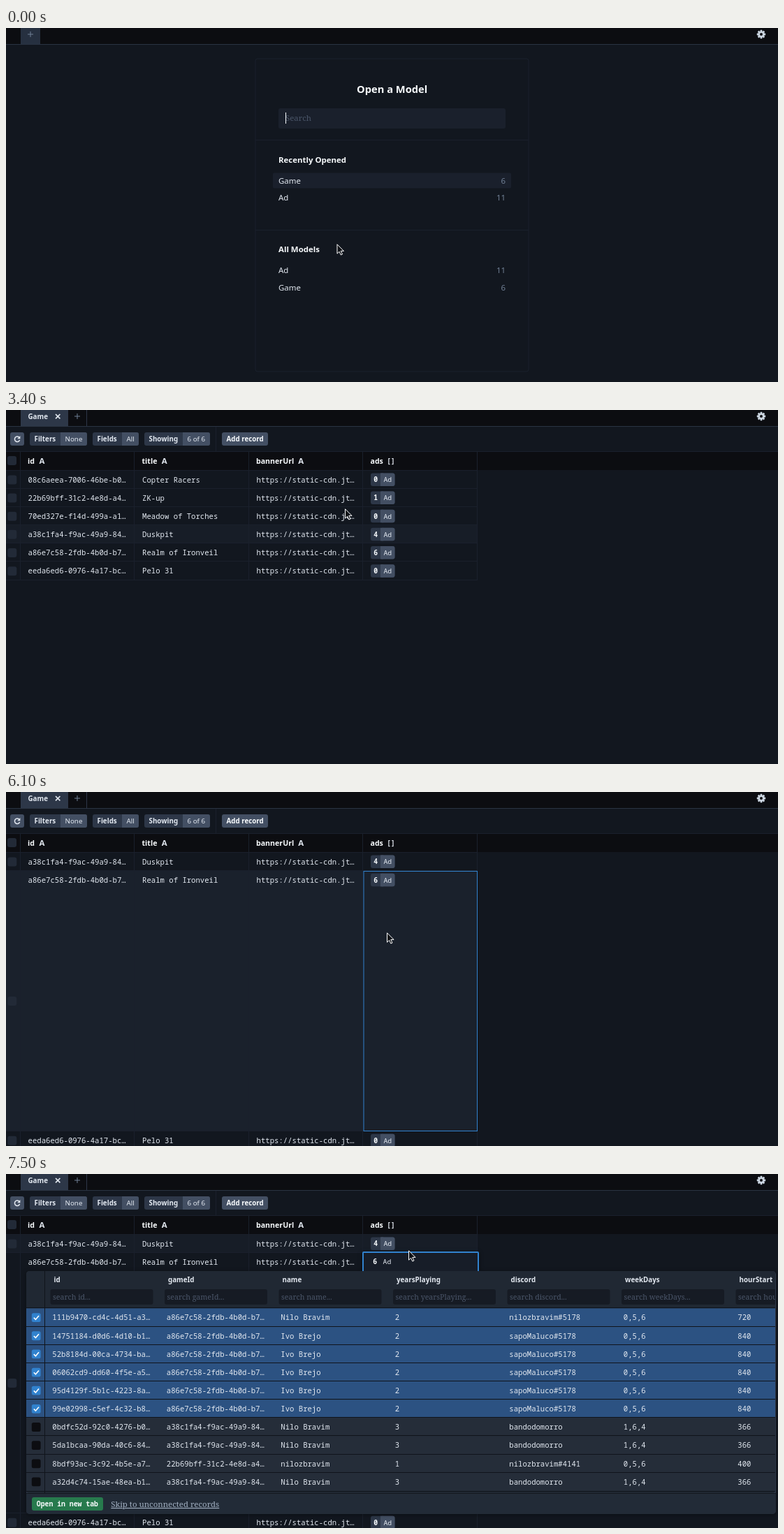
An HTML page that plays this animation: 1105 by 507 pixels, repeating every 8 s.

```html
<!DOCTYPE html>
<html lang="en">
<head>
<meta charset="utf-8">
<title>Data browser</title>
<style>
html, body { margin: 0; width: 100%; height: 100%; overflow: hidden; background: #12171f; }
svg { display: block; width: 1105px; height: 507px; }
text { fill: #e2e8f0; white-space: pre; }
.sans { font-family: "Noto Sans", sans-serif; }
.mono { font-family: "Noto Sans Mono", monospace; }
.serif { font-family: "Noto Serif", serif; }
.b { font-weight: 700; }
.s12 { font-size: 9.81px; }
.s13 { font-size: 10.62px; }
.s14 { font-size: 11.44px; }
.s18 { font-size: 14.7px; }
.dim { fill: #718096; }
.faint { fill: #4a5568; }
.end { text-anchor: end; }
.white { fill: #f7fafc; }
.link { fill: #a0aec0; text-decoration: underline; }
</style>
</head>
<body>
<svg id="stage" viewBox="0 0 1105 507"></svg>
<script>
const LOOP = 8000, COL = 163.5, ROW = 26.15;
const stage = document.getElementById('stage');

const el = (parent, tag, attrs = {}, body) => {
  const node = document.createElementNS('http://www.w3.org/2000/svg', tag);
  for (const key in attrs) node.setAttribute(key, attrs[key]);
  if (body !== undefined) node.textContent = body;
  parent.appendChild(node);
  return node;
};
const group = parent => el(parent, 'g');
const box = (p, x, y, x2, y2, fill, rx = 0, extra = {}) =>
  el(p, 'rect', { x, y, width: x2 - x, height: y2 - y, fill, rx, ...extra });
const text = (p, x, y, str, cls) => el(p, 'text', { x, y, class: cls }, str);
const line = (p, d, stroke, width = 1) =>
  el(p, 'path', { d, stroke, 'stroke-width': width, fill: 'none' });
const show = (node, on) => { node.style.display = on ? '' : 'none'; };

const C = {
  page: '#12171f', black: '#0c0d11', edge: '#1a202c', slate: '#2d3748',
  steel: '#434f63', check: '#222a37', blue: '#3182ce', pale: '#cbd5e0'
};

// ---- tab bar ----
box(stage, 0, 0, 1105, 507, C.page);
box(stage, 0, 0, 1105, 23, C.black);
line(stage, 'M0 23.5H1105', '#2a3342');
const gear = group(stage);
gear.setAttribute('transform', 'translate(1081 9)');
for (let i = 0; i < 8; i++)
  box(gear, -1.4, -6.2, 1.4, -3, C.pale, 0.6, { transform: `rotate(${i * 45})` });
el(gear, 'circle', { r: 3.3, fill: 'none', stroke: C.pale, 'stroke-width': 2.6 });
const plus = (p, x, color) => line(p, `M${x - 4} 9H${x + 4}M${x} 5V13`, color);

// ---- model picker ----
const picker = group(stage);
box(picker, 21, 0, 49, 23, '#263040');
plus(picker, 35, '#718096');
box(picker, 357, 44, 748, 492, 'none', 3, { stroke: C.edge });
line(picker, 'M357 160.5H748M357 289.5H748', C.edge);
text(picker, 502, 93, 'Open a Model', 'sans b s18 white');
box(picker, 390, 115, 715, 144, C.edge, 3);
text(picker, 400, 133, 'Search', 'serif s14 faint');
const caret = box(picker, 400, 121, 401, 137, '#f7fafc');
text(picker, 390, 193, 'Recently Opened', 'sans b s14 white');
text(picker, 390, 321, 'All Models', 'sans b s14 white');
box(picker, 382, 207.5, 723, 229.5, C.edge, 2);

const modelRow = (y, name, count) => {
  const back = box(picker, 382, y - 15, 723, y + 7.5, C.edge, 2);
  const label = text(picker, 390, y, name, 'sans s14');
  const num = text(picker, 715, y, count, 'sans s14 dim end');
  return on => {
    show(back, on);
    label.style.fill = on ? '#fff' : '';
    num.style.fill = on ? '#a0aec0' : '';
  };
};
modelRow(222.5, 'Game', 6)(false);
modelRow(247, 'Ad', 11)(false);
const models = [modelRow(350.5, 'Ad', 11), modelRow(375.5, 'Game', 6)];

// ---- open model: tab and toolbar ----
const model = group(stage);
box(model, 21, 0, 89, 23, C.slate);
text(model, 31.5, 12.5, 'Game', 'sans b s12');
line(model, 'M71 6L77.4 12.4M77.4 6L71 12.4', '#e2e8f0', 1.7);
plus(model, 102, '#718096');
line(model, 'M115.5 0V23', C.slate);
line(model, 'M0 59.5H1105M300.5 24V59', C.edge);
box(model, 6, 32, 26, 51, C.steel, 3);
line(model, 'M18.8 39.2A3.7 3.7 0 1 0 19.6 43', '#e2e8f0', 1.5);
el(model, 'path', { d: 'M20.4 37V41.2H16.2Z', fill: '#e2e8f0' });

const pill = (x, mid, end, label, value) => {
  box(model, x, 32, end, 51, C.slate, 3);
  box(model, mid, 32, end, 51, C.steel, 3);
  box(model, mid, 32, mid + 4, 51, C.steel);
  text(model, x + 6.5, 45, label, 'sans b s12');
  return text(model, mid + 6.5, 45, value, 'sans s12');
};
pill(34, 78, 116, 'Filters', 'None');
pill(124, 166, 190, 'Fields', 'All');
const showing = pill(198, 253, 292, 'Showing', '0 of 6');
box(model, 309, 32, 375, 51, C.steel, 3);
text(model, 315.5, 45, 'Add record', 'sans b s12 white');

// ---- records table ----
const table = group(model);
box(table, 0, 60, 1105, 86, C.black);
line(table, 'M0 86.5H675', C.edge);
box(table, 2, 66, 15, 79, C.check, 3);
['id', 'title', 'bannerUrl', 'ads'].forEach((name, i) =>
  text(table, 31 + i * COL, 77, name, 'sans b s13 white'));
[47.5, 222.7, 418.3].forEach(x => text(table, x, 77, 'A', 'sans b s14'));
text(table, 545, 76.5, '[]', 'mono b s12');

const games = [
  ['08c6aeea-7006-46be-b0…', 'Copter Racers', 0],
  ['22b69bff-31c2-4e8d-a4…', 'ZK-up', 1],
  ['70ed327e-f14d-499a-a1…', 'Meadow of Torches', 0],
  ['a38c1fa4-f9ac-49a9-84…', 'Duskpit', 4],
  ['a86e7c58-2fdb-4b0d-b7…', 'Realm of Ironveil', 6],
  ['eeda6ed6-0976-4a17-bc…', 'Pelo 31', 0]
];

const gameRow = (p, [id, title, ads], top, height = ROW) => {
  const g = group(p), mid = top + 13.3;
  const back = box(g, 0, top, 675, top + height, '#171d27');
  const cy = height > ROW ? top + height / 2 : mid;
  box(g, 2.3, cy - 6.5, 15.3, cy + 6.5, C.check, 3);
  [id, title, 'https://static-cdn.jt…'].forEach((s, i) =>
    text(g, 31.6 + i * COL, mid + 3.8, s, 'mono s13'));
  box(g, 522, mid - 9.5, 556.5, mid + 9, C.slate, 3);
  box(g, 536, mid - 9.5, 556.5, mid + 9, C.steel, 3);
  box(g, 536, mid - 9.5, 540, mid + 9, C.steel);
  text(g, 526.3, mid + 3.4, ads, 'mono b s12 white');
  text(g, 540.4, mid + 3.4, 'Ad', 'mono s12');
  line(g, `M0 ${Math.round(top + height) - 0.5}H675`, C.edge);
  return back;
};
const colLines = (p, y2) =>
  line(p, [0, 1, 2, 3, 4].map(i => `M${Math.floor(21 + i * COL) - 0.5} 60V${y2}`).join(''), C.edge);

const list = group(table);
const backs = games.map((game, i) => gameRow(list, game, 86.6 + i * ROW));
colLines(list, 243);

// ---- list scrolled, one row opened ----
const open = group(table);
const firstBack = gameRow(open, games[3], 86.6);
const openBack = gameRow(open, games[4], 113, 373);
openBack.setAttribute('fill', '#1a212c');
show(gameRow(open, games[5], 486), false);
colLines(open, 507);
const cell = box(open, 512, 113.5, 674.5, 485.5, 'none', 0, { stroke: C.blue });

// ---- relation panel ----
const panel = group(open);
panel.style.filter = 'drop-shadow(0 1px 3px rgba(0,0,0,.4))';
box(panel, 511, 112, 676, 145, '#171d28', 1, { stroke: C.blue, 'stroke-width': 2 });
text(panel, 525.3, 128.5, 6, 'mono b s12 white');
text(panel, 539.5, 128.5, 'Ad', 'mono s12');
box(panel, 29, 139, 1102, 487, C.slate, 5);
box(panel, 29, 458, 1102, 487, '#222b37', 5);
box(panel, 29, 458, 1102, 470, '#222b37');
line(panel, 'M29 457.5H1102', '#141920');
box(panel, 37, 463, 139, 482, '#277a4d', 3);
text(panel, 43.8, 476, 'Open in new tab', 'mono b s12 white');
text(panel, 150.3, 477, 'Skip to unconnected records', 'serif s14 link');

const loading = group(panel);
box(loading, 530.5, 286.5, 600.5, 310.5, C.slate, 3,
  { stroke: '#4a5568', style: 'filter:drop-shadow(0 1px 2px rgba(0,0,0,.35))' });
text(loading, 536, 302, 'Loading...', 'mono s12');

const G = ['a86e7c58-2fdb-4b0d-b7…', 'a38c1fa4-f9ac-49a9-84…', '22b69bff-31c2-4e8d-a4…'];
const mate = id => [id, G[0], 'Ivo Brejo', 2, 'sapoMaluco#5178', '0,5,6', 840];
const band = id => [id, G[1], 'Nilo Bravim', 3, 'bandodomorro', '1,6,4', 366];
const ads = [
  ['111b9470-cd4c-4d51-a3…', G[0], 'Nilo Bravim', 2, 'nilozbravim#5178', '0,5,6', 720],
  mate('14751184-d0d6-4d10-b1…'),
  mate('52b8184d-00ca-4734-ba…'),
  mate('06062cd9-dd60-4f5e-a5…'),
  mate('95d4129f-5b1c-4223-8a…'),
  mate('99e02998-c5ef-4c32-b8…'),
  band('0bdfc52d-92c0-4276-b0…'),
  band('5da1bcaa-90da-40c6-84…'),
  ['8bdf93ac-3c92-4b5e-a7…', G[2], 'nilozbravim', 1, 'nilozbravim#4141', '0,5,6', 400],
  band('a32d4c74-15ae-48ea-b1…')
];

const clip = el(stage, 'clipPath', { id: 'inner' });
box(clip, 29, 139, 1101, 457, '#fff', 4);
const grid = group(panel);
grid.setAttribute('clip-path', 'url(#inner)');
box(grid, 29, 139, 1102, 462, '#202833', 4);
['id', 'gameId', 'name', 'yearsPlaying', 'discord', 'weekDays', 'hourStart'].forEach((name, i) => {
  const x = i * COL;
  text(grid, 68.5 + x, 154.5, name, 'sans b s12');
  box(grid, 63.5 + x, 165, 210.5 + x, 187, '#161b24', 3);
  text(grid, 67 + x, 179.5, `search ${name}...`, 'serif s13 faint');
});
ads.forEach((row, i) => {
  const top = 192.4 + i * ROW, mid = top + 13.2, on = i < 6;
  box(grid, 29, top, 1102, top + ROW, on ? '#2c5282' : '#252d39');
  line(grid, `M29 ${Math.round(top) - 0.5}H1102`, '#10141b');
  box(grid, 36.8, mid - 6.4, 49.6, mid + 6.4, on ? C.blue : C.black, 2.5);
  if (on) line(grid, `M39.8 ${mid + 0.2}l2.6 2.6l4.6 -5.4`, '#fff', 1.6);
  row.forEach((s, c) => text(grid, 66.3 + c * COL, mid + 3.8, s, 'mono s13'));
});
line(grid, 'M29 454.5H1102M55.5 139V457', '#10141b');

// ---- pointer ----
const pointer = el(stage, 'path', {
  d: 'M.5 .8V14.2L3.6 11.3L5.8 16L8 15L5.8 10.4H10Z',
  fill: '#0e1116', stroke: '#fff', 'stroke-width': 1, 'stroke-linejoin': 'round'
});

// time, x, y
const moves = [
  [0, 473.5, 309], [100, 461, 312], [300, 453, 316], [400, 441, 323], [500, 430, 332],
  [600, 419, 342], [700, 410, 352], [800, 404, 361], [900, 400.5, 366], [1400, 400.5, 368],
  [2500, 415, 335], [3100, 478, 195], [3300, 482, 166], [3400, 485, 141], [3600, 489, 87],
  [3800, 488, 81], [3900, 486, 85], [4100, 480, 98], [4200, 470, 126], [4300, 458.5, 154],
  [4500, 467, 170], [4700, 512, 176], [4800, 545, 179], [5100, 545, 188], [5200, 545, 195],
  [5400, 545, 196], [5500, 545, 197], [5600, 545, 198], [6100, 545, 201],
  [7200, 567, 128], [7500, 576, 109]
];
// time, highlighted row
const modelHover = [[0, -1], [500, 0], [800, 1]];
const rowHover = [
  [0, -1], [3100, 5], [3300, 4], [3400, 3], [3600, 1], [3800, 0],
  [4300, 1], [4500, 2], [4700, 3], [5400, 4]
];
const at = (keys, t) => keys.reduce((hit, key) => key[0] <= t ? key : hit);

function draw(t) {
  const [, x, y] = at(moves, t);
  pointer.setAttribute('transform', `translate(${x} ${y})`);

  show(picker, t < 1400);
  show(model, t >= 1400);
  show(caret, t < 1100);
  const overModel = at(modelHover, t)[1];
  models.forEach((set, i) => set(i === overModel));

  showing.textContent = t < 1800 ? '0 of 6' : '6 of 6';
  show(table, t >= 1800);
  show(list, t < 6100);
  show(open, t >= 6100);
  const overRow = at(rowHover, t)[1];
  backs.forEach((back, i) => show(back, i === overRow));

  show(openBack, t < 6300);
  show(cell, t < 6300);
  show(panel, t >= 6300);
  show(loading, t < 6600);
  show(grid, t >= 6600);
  show(firstBack, t >= 7500);
}

function tick() {
  draw(performance.now() % LOOP);
  requestAnimationFrame(tick);
}
draw(0);
tick();
</script>
</body>
</html>
```
